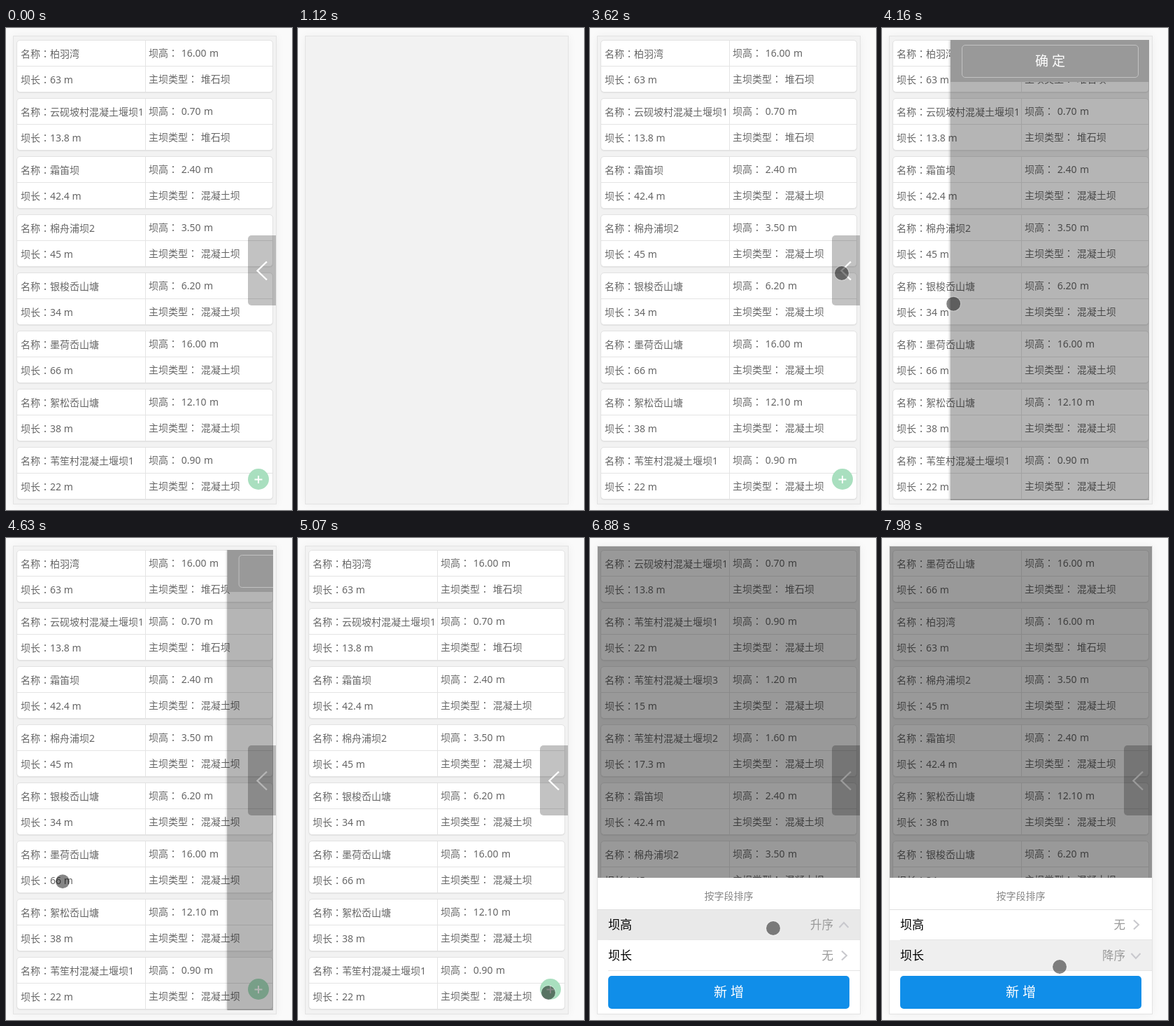
Animation of 409x688 px, one loop 8 s. Source, as an HTML page:

```html
<!DOCTYPE html>
<html lang="zh-CN">
<head>
<meta charset="utf-8">
<title>Dam list</title>
<style>
  html, body { margin: 0; width: 100%; height: 100%; overflow: hidden; background: #fafafa; }
  body { position: relative; font: 14px/20px "Noto Sans", "Noto Sans CJK SC", "Noto Sans CJK", sans-serif; color: #666; }
  div, span, svg { position: absolute; box-sizing: border-box; white-space: pre; }
  #phone { left: 10px; top: 11px; width: 377px; height: 669px; border: 1px solid #e3e3e3; background: #f2f2f2; overflow: hidden; box-shadow: 0 0 12px rgba(0,0,0,.05); }
  #page, #list, #mask { inset: 0; }
  .card { left: 4px; width: 367px; height: 75px; border: 1px solid #e2e2e2; border-radius: 5px; background: #fff; box-shadow: 0 1px 1px rgba(0,0,0,.06); }
  .card::before, .card::after { content: ""; position: absolute; background: #e4e4e4; }
  .card::before { left: 0; right: 0; top: 36px; height: 1px; }
  .card::after { top: 0; bottom: 0; left: 183px; width: 1px; }
  .card span:nth-child(odd) { left: 5px; }
  .card span:nth-child(even) { left: 188px; word-spacing: 1px; }
  .card i { font: 14px/1 "Noto Sans CJK JP", "Noto Sans CJK", sans-serif; }
  #track { left: 365px; top: 8px; width: 3px; height: 641px; border-radius: 2px; background: rgba(0,0,0,.12); }
  #bar { left: 0; top: 0; width: 3px; height: 531px; border-radius: 2px; background: rgba(0,0,0,.28); }
  #handle { left: 335px; top: 284px; width: 40px; height: 100px; border-radius: 5px 0 0 5px; background: rgba(0,0,0,.24); }
  #add { left: 335px; top: 617px; width: 30px; height: 30px; border-radius: 50%; background: #a9dfbf; }
  svg { left: 0; top: 0; overflow: visible; fill: none; stroke: #fff; stroke-width: 2; }
  #view { left: 0; top: 5px; width: 371px; height: 657px; overflow: hidden; }
  #drawer { left: 87px; top: 0; width: 284px; height: 657px; background: rgba(0,0,0,.29); border-bottom: 1px solid rgba(0,0,0,.12); box-shadow: 0 0 4px rgba(0,0,0,.4); }
  #head { left: 0; top: 0; width: 284px; height: 60px; background: #999; }
  #ok { left: 16px; top: 7px; width: 253px; height: 47px; border: 1px solid #c2c2c2; border-radius: 5px; text-align: center; color: #fff; font-size: 19px; line-height: 45px; }
  #mask { background: #000; }
  #sheet { left: 0; top: 473px; width: 375px; height: 194px; background: #fff; }
  #title { left: 0; width: 375px; top: 16px; text-align: center; color: #888; }
  .row { left: 0; width: 375px; height: 44px; font-size: 17px; line-height: 44px; color: #000; }
  .row::after { content: ""; position: absolute; left: 15px; right: 0; bottom: 0; height: 1px; background: #e5e5e5; }
  .row span { left: 15px; }
  .row .val { left: auto; right: 38px; color: #999; font-size: 16.5px; }
  .row svg { left: 352px; top: 22px; stroke: #c8c8cd; }
  #line { left: 0; top: 45px; width: 375px; height: 1px; background: #e0e0e0; }
  #new { left: 15px; top: 140px; width: 345px; height: 47px; border-radius: 5px; background: #108ee9; color: #fff; font-size: 19px; line-height: 47px; text-align: center; }
  #status { left: 10px; top: 657px; width: 125px; height: 23px; border: 1px solid #ccc; border-radius: 0 4px 0 0; background: #f2f2f2; font-size: 12px; line-height: 21px; padding-left: 3px; color: #555; }
  #cursor { left: -11px; top: -11px; width: 22px; height: 22px; border-radius: 50%; border: 1.5px solid rgba(255,255,255,.25); background: rgba(0,0,0,.48); background-clip: padding-box; }
</style>
</head>
<body>
<div id="phone">
  <div id="page">
    <div id="list"></div>
    <div id="track"><div id="bar"></div></div>
    <div id="handle"><svg width="40" height="100"><path stroke-width="2.4" d="M27 37.500L13.500 50.500L27 63.500"/></svg></div>
    <div id="add"><svg width="30" height="30"><path d="M9.500 15.500h11M15 10v11"/></svg></div>
  </div>
  <div id="view"><div id="drawer"><div id="head"><div id="ok">确 定</div></div></div></div>
  <div id="mask"></div>
  <div id="sheet">
    <div id="title">按字段排序</div>
    <div class="row" style="top:45px"><span>坝高</span><span class="val"></span><svg width="1" height="1"><path/></svg></div>
    <div class="row" style="top:89px"><span>坝长</span><span class="val"></span><svg width="1" height="1"><path/></svg></div>
    <div id="line"></div>
    <div id="new">新 增</div>
  </div>
</div>
<div id="status">正在等待 localhost ...</div>
<div id="cursor"></div>
<script>
const LOOP = 8000;
const TICK = 77.95; // the screen refreshes at this interval
const $ = id => document.getElementById(id);
const clamp = v => Math.max(0, Math.min(1, v));
const easeOut = v => 1 - (1 - clamp(v)) ** 3;
const easeSine = v => (1 - Math.cos(Math.PI * clamp(v))) / 2;
const refreshTime = t => 1120 + TICK * Math.floor((t - 1120 + 26) / TICK);

const dams = [
  ['柏羽湾', 16, 63, '堆石坝'],
  ['云砚坡村混凝土堰坝1', .7, 13.8, '堆石坝'],
  ['霜笛坝', 2.4, 42.4],
  ['棉舟浦坝2', 3.5, 45],
  ['银梭岙山塘', 6.2, 34],
  ['墨荷岙山塘', 16, 66],
  ['絮松岙山塘', 12.1, 38],
  ['苇笙村混凝土堰坝1', .9, 22],
  ['苇笙村混凝土堰坝2', 1.6, 17.3],
  ['苇笙村混凝土堰坝3', 1.2, 15]
];

// Each pointer move eases to a place, optionally along a bent path
const moves = [
  { from: 2950, to: 3620, x: 360, y: 350, bend: -.13 },
  { from: 3740, to: 4320, x: 47, y: 403 },
  { from: 4440, to: 5070, x: 358, y: 649, bend: .2 },
  { from: 5380, to: 5480, x: 186, y: 610 },
  { from: 5490, to: 6330, x: 294, y: 550 },
  { from: 6460, to: 6710, x: 262, y: 557 },
  { from: 7010, to: 7430, x: 271, y: 610 },
  { from: 7600, to: 7740, x: 254, y: 612 }
];

function pointer(t) {
  let x = 388, y = 644;
  for (const m of moves) {
    if (t < m.from) break;
    const k = easeSine((t - m.from) / (m.to - m.from));
    const dx = m.x - x, dy = m.y - y;
    const bow = (m.bend || 0) * Math.sin(Math.PI * k);
    x += dx * k - dy * bow;
    y += dy * k + dx * bow;
  }
  return [x, y];
}

const marks = {
  无: 'M-3 -6.500L4 0L-3 6.500',
  升序: 'M-6.500 4L0 -3L6.500 4',
  降序: 'M-6.500 -3L0 4L6.500 -3'
};
const rows = [...document.querySelectorAll('.row')];

let shown = '';
function showList(col, dir) {
  const key = col + ':' + dir;
  if (key === shown) return;
  shown = key;
  const order = dir ? [...dams].sort((a, b) => dir * (a[col] - b[col])) : dams;
  $('list').innerHTML = order.slice(0, 8).map(([name, high, long, type = '混凝土坝'], i) => {
    const cell = (top, label, text) => `<span style="top:${top}px">${label}<i lang="ja">：</i>${text}</span>`;
    return `<div class="card" style="top:${5 + 83 * i}px">` +
      cell(9, '名称', name) + cell(8, '坝高', ` ${high.toFixed(2)} m`) +
      cell(46, '坝长', `${long} m`) + cell(45, '主坝类型', ' ' + type) + '</div>';
  }).join('');
  rows.forEach((row, i) => {
    const state = col === i + 1 && dir ? (dir > 0 ? '升序' : '降序') : '无';
    row.querySelector('.val').textContent = state;
    row.querySelector('path').setAttribute('d', marks[state]);
  });
}

function draw(time) {
  const t = refreshTime(time);
  const show = (id, on) => $(id).style.display = on ? '' : 'none';

  // Reload
  $('page').style.opacity = t < 1110 ? 1 : clamp((t - 1900) / 440);
  $('track').style.opacity = t < 1900 ? 0 : clamp((2940 - t) / 500);
  show('status', t >= 1720 && t < 2430);

  // Side drawer
  const open = t < 4500 ? easeOut((t - 3720) / 330) : 1 - easeOut((t - 4500) / 330);
  const busy = t >= 3740 && t < 4520;
  show('handle', !busy);
  show('add', !busy);
  show('drawer', open > 0);
  $('drawer').style.transform = `translateX(${284 * (1 - open)}px)`;

  // Sort sheet
  show('sheet', t > 5380);
  $('sheet').style.transform = `translateY(${Math.round(194 * (1 - easeOut((t - 5380) / 244)))}px)`;
  $('mask').style.opacity = .4 * clamp((t - 5360) / 120);
  rows[0].style.background = t >= 6850 && t < 7010 ? '#e9e9e9' : '';
  rows[1].style.background = t >= 7425 ? '#efefef' : '';

  if (t < 6460) showList(0, 0);
  else if (t < 7010) showList(1, 1);
  else if (t < 7480) showList(1, -1);
  else showList(2, t < 7950 ? 1 : -1);

  const [x, y] = pointer(t);
  show('cursor', t >= 2960);
  $('cursor').style.transform = `translate(${x}px, ${y}px)`;
}

const start = performance.now();
function frame() {
  draw((performance.now() - start) % LOOP);
  requestAnimationFrame(frame);
}
frame();
</script>
</body>
</html>
```
